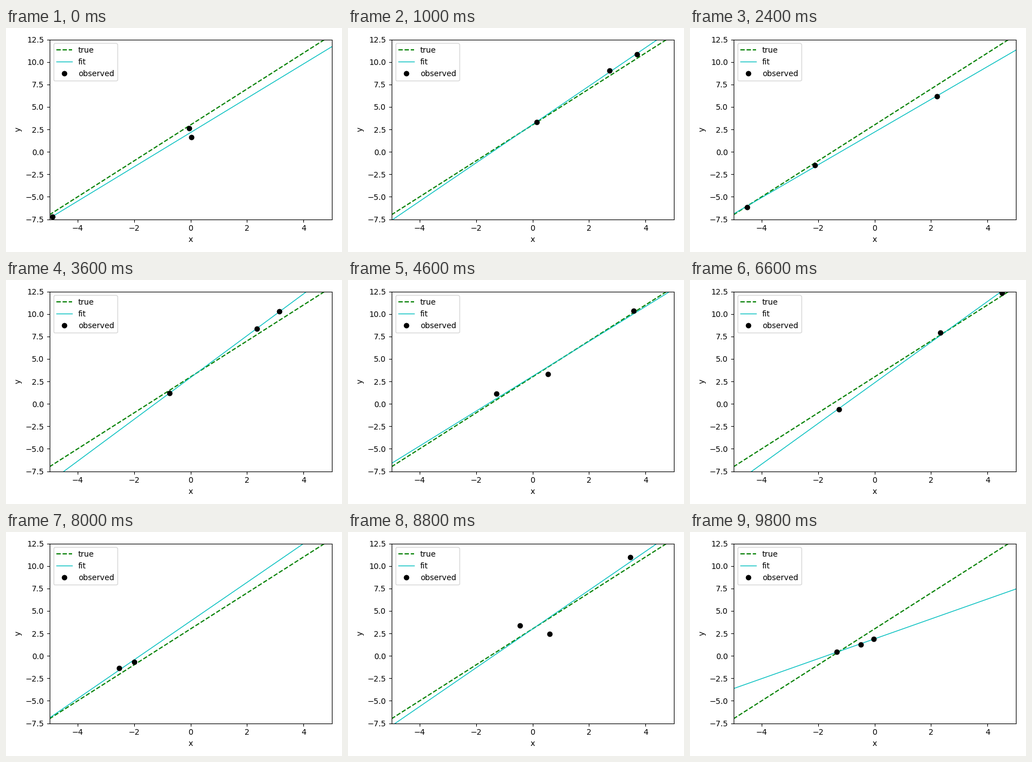
A matplotlib script that plays this animation: 600 by 400 pixels, repeating every 10 s.

```python
import numpy as np
import matplotlib.pyplot as plt
from matplotlib.animation import FuncAnimation

FRAMES, STEP_MS = 50, 200
SLOPE, INTERCEPT = 2.0, 3.0
X_LIM, Y_LIM = (-5, 5), (-7.5, 12.5)
SEED = 9


def truth(x):
    return SLOPE * x + INTERCEPT


def sample(step):
    """Three noisy observations of the true line, redrawn each step."""
    rng = np.random.RandomState(SEED + step)
    x = rng.uniform(*X_LIM, 3)
    return x, truth(x) + rng.normal(0, 1, 3)


def axes_rect(left, top, right, bottom, width=600, height=400):
    return [left / width, 1 - bottom / height,
            (right - left) / width, (bottom - top) / height]


fig = plt.figure(figsize=(6, 4), dpi=100)
ax = fig.add_axes(axes_rect(77.6, 20.55, 581.6, 341.55))
ax.set(xlim=X_LIM, ylim=Y_LIM, xlabel="x", ylabel="y")
ax.set_xticks(range(-4, 5, 2))
ax.set_yticks(np.arange(-7.5, 12.6, 2.5))

grid = np.linspace(*X_LIM, 50)
ax.plot(grid, truth(grid), "g--", label="true")
fit_line, = ax.plot([], [], "c-", lw=1, label="fit")
dots, = ax.plot([], [], "ko", label="observed")
ax.legend(loc="upper left")


def update(step):
    x, y = sample(step)
    fit_line.set_data(grid, np.polyval(np.polyfit(x, y, 1), grid))
    dots.set_data(x, y)
    return fit_line, dots


def reset():
    return update(0)


anim = FuncAnimation(fig, update, frames=FRAMES, init_func=reset,
                     interval=STEP_MS, repeat=True, repeat_delay=0)
plt.show()
```
